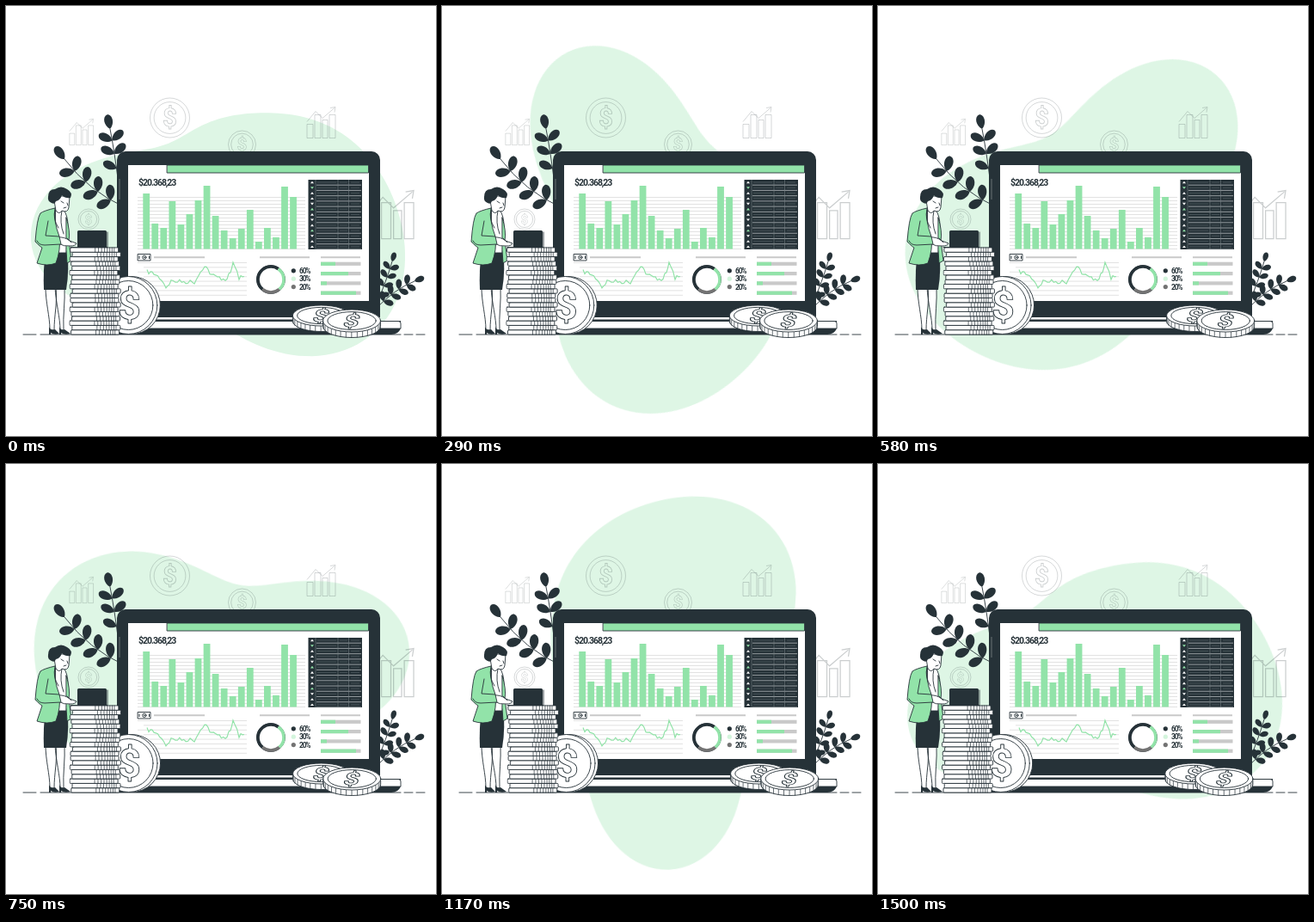
Write an HTML page that moves like this. It is 500 px wide and 500 px high and loops after 1.54 s.

```html
<!DOCTYPE html>
<html lang="en">
<head>
<meta charset="utf-8">
<title>Finance dashboard</title>
<style>
  html, body { margin: 0; width: 100%; height: 100%; overflow: hidden; background: #fff; }
  svg { display: block; width: 100vw; height: 100vh; }
  text { font-family: Roboto, Arial, sans-serif; font-weight: 700; fill: #263238; }
  .dark { fill: #263238; }
  .green { fill: #92e3a9; }
  .ink { stroke: #263238; stroke-width: .9; stroke-linejoin: round; stroke-linecap: round; }
  .paper { fill: #fff; }
  .none { fill: none; }
  .faint { fill: none; stroke: #263238; stroke-opacity: .24; stroke-width: .8; }
  .dollar { text-anchor: middle; dominant-baseline: central; }
  #blob { fill: #def6e5; transform-origin: 250px 250px; animation: turn 1540ms steps(37) -4ms infinite; }
  .sway { animation: sway 385ms ease-in-out -663ms infinite alternate; }
  @keyframes turn { to { transform: rotate(360deg); } }
  @keyframes sway { from { transform: translateX(-1.1px); } to { transform: translateX(1.9px); } }
</style>
</head>
<body>
<svg id="stage" viewBox="0 0 500 500">
  <defs>
    <g id="chart">
      <path d="M1 37V21h7v16zM10 37V10h7v27zM19 37V16h6v21zM27 37V10h7v27zM1 18 11 6l8 8L33 2M28 2l6-1-1 6"/>
    </g>
    <g id="sign"><text class="dollar" font-size="27" style="fill:none">$</text></g>
  </defs>

  <path id="blob"/>

  <g class="faint">
    <use href="#chart" transform="translate(349 116.500)"/>
    <use href="#chart" transform="translate(73 130.500) scale(.84)"/>
    <use href="#chart" transform="translate(421 213) scale(1.56)"/>
    <g id="tokens"></g>
  </g>

  <g id="plants" class="dark"></g>
  <path class="ink none" d="M20 382H35M40 382H459M463 382H473M477 382H487"/>

  <!-- laptop -->
  <rect class="dark" x="129" y="169" width="306" height="200" rx="10"/>
  <path class="dark" d="M129 358H435V366H459V375Q456 382 448 382H130z"/>
  <path class="paper" d="M133 362H435V364.500H133z"/>
  <path class="paper ink" d="M133 366.500H456Q459 366.500 459 369V375H133z"/>
  <path class="none" stroke="#7d8487" stroke-width=".8" d="M132 201v24"/>
  <rect class="paper" x="142" y="185" width="280" height="158"/>
  <rect class="green ink" x="187.500" y="185" width="234" height="9"/>
  <text x="154" y="209" font-size="10.500" letter-spacing="-1.050">$20.368,23</text>
  <g id="bars"></g>
  <g id="table"></g>

  <rect class="paper ink" x="153.500" y="288.500" width="14.500" height="7.500"/>
  <path class="none" stroke="#263238" stroke-width="1" d="M155 290.500v3.500M166.500 290.500v3.500"/>
  <circle class="none ink" cx="160.800" cy="292.300" r="2.200"/>
  <circle class="dark" cx="160.800" cy="292.300" r=".9"/>
  <path class="none" stroke="#c9c9c9" stroke-width="2" d="M172 292.300H231M295 292.300H353M366 292.300H412"/>
  <g id="trend"></g>
  <g id="donut"></g>
  <g id="meters"></g>

  <!-- woman -->
  <path class="paper ink" d="M46 326C46 346 51 360 51 377H56C56 360 60 344 58 327M57 327C58 346 63 362 63 377H67C66 360 69 344 68 326"/>
  <path class="dark" d="M50 373Q52 378 57 376L62 381Q56 383 52 380V382H50zM62 373Q64 378 68 376L75 381Q68 383 64 380V382H62z"/>
  <path class="dark" d="M46 284H71Q74 305 70 330H44Q43 308 46 284z"/>
  <path class="paper ink" d="M58 236L67 237Q72 244 72 256L70 287H57z"/>
  <path class="green ink" d="M70 246Q75 262 73 273L76 296 71 299 70 284z"/>
  <path class="green ink" d="M57 235Q44 238 40 241Q36 247 34 274Q40 280 42 281L36 299Q48 303 58 299Q64 283 62 268Q55 250 57 235z"/>
  <path class="paper ink" d="M60 269Q68 268 74 273L82 276Q81 279 75 279Q67 280 61 276z"/>
  <path class="green ink" d="M36 273Q38 278 45 278L64 277 62 268 46 267 49 250"/>
  <path class="none ink" d="M57 237Q54 247 61 258M65 238Q62 252 67 265M71 270l5 5"/>
  <path class="paper ink" d="M56 226L58 238Q62 243 65 238Q72 241 73 234L74 221H58z"/>
  <path class="dark" d="M49 222Q49 213 57 213Q64 208 71 213Q78 217 75 223Q69 224 65 220Q63 226 58 227Q57 231 53 229Q48 227 49 222z"/>
  <path class="none ink" d="M64 227l3 2M71 229l1 3M67 235l3-1" stroke-width=".7"/>

  <!-- coins on the left -->
  <g class="sway">
    <g class="paper ink">
      <circle cx="146.500" cy="348" r="33.500"/>
      <circle cx="143" cy="348" r="33.500"/>
      <circle cx="143" cy="348" r="28.500"/>
    </g>
    <text class="dollar ink" x="144" y="347" font-size="47" style="fill:#fff" stroke-width="1.100">$</text>
    <g id="stack" class="paper ink"></g>
  </g>
  <rect class="dark" x="83" y="261" width="34" height="20" rx="1.500"/>
  <path class="none ink" d="M76 280.500H118V263"/>

  <!-- coins on the right -->
  <g id="flat" class="sway"></g>
</svg>

<script>
  const { sin, cos, atan2, PI } = Math;
  const $ = id => document.getElementById(id);
  const put = (id, items) => { $(id).innerHTML = items.join(''); };
  const range = (n, fn) => Array.from({ length: n }, (_, i) => fn(i));
  const rect = (x, y, w, h, attrs) => `<rect x="${x}" y="${y}" width="${w}" height="${h}" ${attrs}/>`;
  const line = (d, color, w) => `<path d="${d}" fill="none" stroke="${color}" stroke-width="${w}"/>`;

  let seed = 7;
  const rand = () => (seed = seed * 16807 % 2147483647) / 2147483647;

  // Blob radius as a short Fourier series
  const waves = [[16, 14.3], [46.7, 4.2], [-17.7, 13.2], [3.6, -2.7], [-3.3, 0]];
  const radius = a => waves.reduce((r, [c, s], i) => r + c * cos((i + 1) * a) + s * sin((i + 1) * a), 163.6);
  $('blob').setAttribute('d', 'M' + range(180, i => {
    const a = i * PI / 90, r = radius(a);
    return [250 + r * cos(a), 250 + r * sin(a)].map(v => v.toFixed(2));
  }).join('L') + 'z');

  const token = (x, y, r) => `<circle cx="${x}" cy="${y}" r="${r}"/><circle cx="${x}" cy="${y}" r="${r * .8}"/>
    <use href="#sign" transform="translate(${x} ${y}) scale(${r / 21})"/>`;
  put('tokens', [token(190.5, 130, 23), token(274.5, 161, 16), token(96, 248, 12)]);

  const leaf = (x, y, deg, l) =>
    `<path transform="translate(${x} ${y}) rotate(${deg})" d="M0 0C${l * .3} ${-l * .4} ${l * .95} ${-l * .36} ${l} 0C${l * .95} ${l * .36} ${l * .3} ${l * .4} 0 0z"/>`;

  // Curved stem with leaf pairs and one leaf at the tip
  function branch([ax, ay], [bx, by], [cx, cy], pairs, size) {
    const mix = (a, b, c, t) => (1 - t) ** 2 * a + 2 * t * (1 - t) * b + t * t * c;
    const slope = (a, b, c, t) => (1 - t) * (b - a) + t * (c - b);
    const leaves = range(pairs + 1, i => {
      const t = (i + 1) / (pairs + 1), x = mix(ax, bx, cx, t), y = mix(ay, by, cy, t);
      const deg = atan2(slope(ay, by, cy, t), slope(ax, bx, cx, t)) * 180 / PI;
      return (i < pairs ? [-57, 57] : [0]).map(turn => leaf(x, y, deg + turn, size)).join('');
    });
    return line(`M${ax} ${ay}Q${bx} ${by} ${cx} ${cy}`, '#263238', .9) + leaves.join('');
  }
  put('plants', [
    branch([131, 208], [126, 168], [121, 143], 3, 17),
    branch([138, 234], [96, 215], [68, 178], 4, 18),
    branch([430, 349], [443, 318], [449, 297], 4, 11),
    branch([430, 352], [452, 329], [475, 320], 4, 12)
  ]);

  const tops = [218, 253, 258, 227, 254, 242, 226, 209, 244, 261, 270, 259, 237, 274, 258, 269, 210, 222];
  put('bars', [
    ...range(16, i => line(`M153 ${222.5 + i * 4}H348`, '#d6d6d6', .7)),
    ...tops.map((y, i) => rect(159.3 + i * 10.05, y, 7.8, 282.5 - y, 'class="green"'))
  ]);

  put('table', [
    rect(351.5, 202, 62.5, 81, 'class="dark"'),
    ...range(13, i => {
      const y = 205.1 + i * 6.23, up = i % 3 != 1;
      return `<path fill="${i % 4 == 1 ? '#92e3a9' : '#fff'}" d="M354 ${y + (up ? 1.2 : -1.2)}h4l-2 ${up ? -2.6 : 2.6}z"/>` +
        line(`M361 ${y + 3.1}H413`, '#c3c8ca', .7) +
        line(`M362 ${y}h22M388 ${y}h9M401 ${y}h10`, '#5a656a', .6);
    }),
    line('M360 202V283M386 202V283M398.500 202V283', '#768085', .6)
  ]);

  // Few key points joined by noisy steps
  const knots = [[164, 309], [172, 311], [181, 318], [186, 327], [192, 320], [219, 321], [231, 301],
    [239, 313], [255, 318], [261, 311], [264, 298], [271, 316], [279, 315]];
  const jagged = knots.slice(1).flatMap(([x, y], i) => {
    const [u, v] = knots[i], n = Math.ceil((x - u) / 2.5);
    return range(n, k => [u + (x - u) * k / n, v + (y - v) * k / n + rand() * 5 - 2.5]);
  });
  put('trend', [
    ...range(8, i => line(`M${i % 2 ? 160 : 153} ${298.5 + i * 5.4}H280`, '#d6d6d6', .7)),
    line('M' + jagged.join('L'), '#92e3a9', 1.2)
  ]);

  const polar = (deg, r) => [308 + r * cos(deg * PI / 180), 318 + r * sin(deg * PI / 180)];
  const arc = (from, to, color) =>
    line(`M${polar(from, 15)}A15 15 0 ${+(to - from > 180)} 1 ${polar(to, 15)}`, color, 3.6);
  put('donut', [
    '<circle class="none ink" cx="308" cy="318" r="16.500"/>',
    arc(130, 305, '#263238'), arc(-55, 50, '#92e3a9'), arc(50, 130, '#737373'),
    ...[['60%', '#263238'], ['30%', '#d3f4dc'], ['20%', '#737373']].map(([label, color], i) =>
      `<circle cx="334.300" cy="${307.8 + i * 9.4}" r="2.600" fill="${color}"/>
       <text x="341" y="${310.8 + i * 9.4}" font-size="8.500" letter-spacing="-1.250">${label}</text>`)
  ]);

  put('meters', [17, 32, 7, 41].map((w, i) =>
    rect(366, 297.7 + i * 11.3, 46.5, 4.2, 'fill="#c9c9c9"') +
    rect(366, 297.7 + i * 11.3, w, 4.2, 'class="green"')));

  put('stack', range(19, i => {
    const y = 376.7 - i * 5.32, x = 76.2 + sin(i * 2.3) * 1.7;
    const ticks = range(8, k => `M${x + 29 + k * 4 - k * k * .12} ${y}v5.3`).join('');
    return rect(x, y, 56, 5.3, 'rx="1"') + `<path stroke-width=".7" d="${ticks}"/>`;
  }));

  function flatCoin(x, y, rx, ry) {
    const h = 6.5;
    const ticks = range(15, k => {
      const a = (12 + k * 11.2) * PI / 180;
      return `M${x + rx * cos(a)} ${y + ry * sin(a)}v${h}`;
    }).join('');
    return `<g class="paper ink">
      <path d="M${x - rx} ${y}v${h}A${rx} ${ry} 0 0 0 ${x + rx} ${y + h}v${-h}z"/>
      <path stroke-width=".7" d="${ticks}"/>
      <ellipse cx="${x}" cy="${y}" rx="${rx}" ry="${ry}"/>
      <ellipse cx="${x}" cy="${y}" rx="${rx * .84}" ry="${ry * .8}"/></g>
      <text class="dollar ink" font-size="25" style="fill:#fff"
        transform="translate(${x} ${y}) skewX(-18) scale(1.3 .8)">$</text>`;
  }
  put('flat', [flatCoin(367, 360, 33, 12), flatCoin(402.7, 366, 33.5, 13)]);
</script>
</body>
</html>
```
